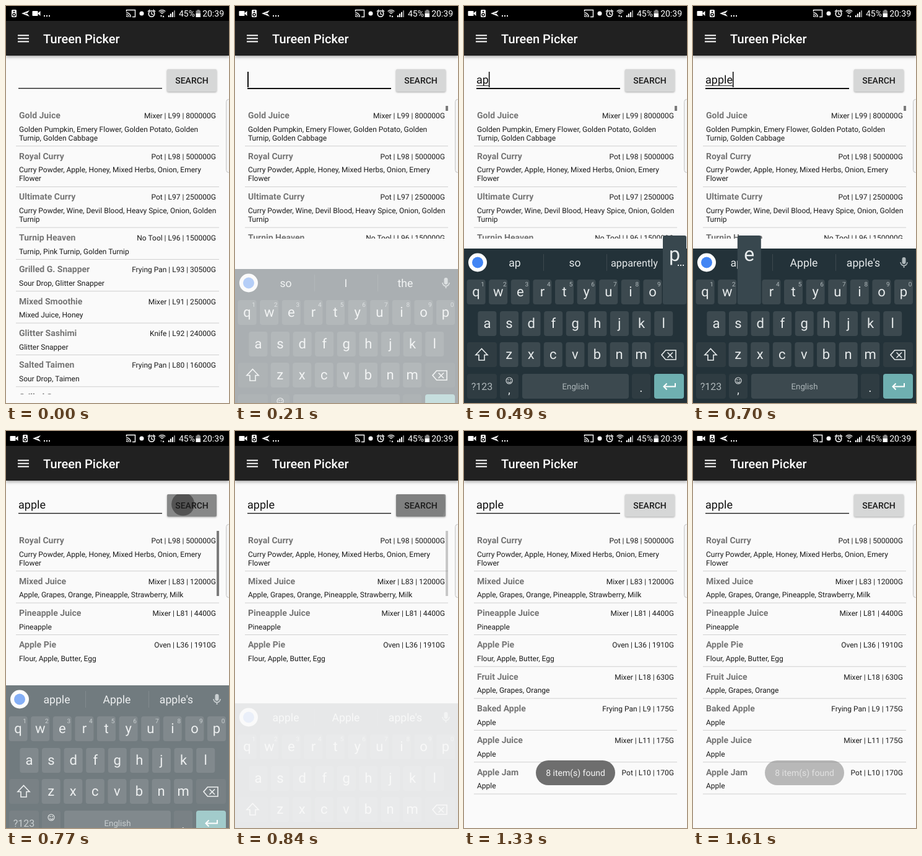
Recreate the animation shown at these times as an HTML page with a canvas. Size 360x640 px, loop 1680 ms.

```html
<!DOCTYPE html>
<html lang="en">
<head>
<meta charset="utf-8">
<title>Tureen Picker</title>
<style>
html, body { margin: 0; width: 100%; height: 100%; overflow: hidden; background: #fafafa; }
canvas { display: block; }
</style>
</head>
<body>
<canvas id="stage" width="360" height="640"></canvas>
<script>
const W = 360, H = 640, LOOP = 1680, STEP = 70;
const screen = document.getElementById('stage').getContext('2d');
const layer = document.createElement('canvas');
layer.width = W;
layer.height = H;
const keys = layer.getContext('2d');
for (const c of [screen, keys]) c.textRendering = 'geometricPrecision';
let g = screen;

const smooth = (t, a, b) => {
  const x = Math.min(1, Math.max(0, (t - a) / (b - a)));
  return x * x * (3 - 2 * x);
};

function rect(x, y, w, h, color) {
  g.fillStyle = color;
  g.fillRect(x, y, w, h);
}
function round(x, y, w, h, r, color) {
  g.beginPath();
  g.roundRect(x, y, w, h, r);
  g.fillStyle = color;
  g.fill();
}
function disc(x, y, r, color) {
  g.beginPath();
  g.arc(x, y, r, 0, 7);
  g.fillStyle = color;
  g.fill();
}
function poly(points, color, stroke) {
  g.beginPath();
  for (let i = 0; i < points.length; i += 2) g.lineTo(points[i], points[i + 1]);
  if (stroke) {
    g.strokeStyle = color;
    g.lineWidth = stroke;
    g.stroke();
  } else {
    g.fillStyle = color;
    g.fill();
  }
}
function arc(x, y, r, a, b, color, width) {
  g.beginPath();
  g.arc(x, y, r, a, b);
  g.strokeStyle = color;
  g.lineWidth = width;
  g.stroke();
}
function text(s, x, y, size, color, weight = 400, align = 'left') {
  g.font = `${weight} ${size}px Roboto, sans-serif`;
  g.textAlign = align;
  g.fillStyle = color;
  g.fillText(s, x, y);
}
function at(x, y, draw) {
  g.save();
  g.translate(x, y);
  draw();
  g.restore();
}

// name, tool and price, ingredient lines
const allItems = [
  ['Gold Juice', 'Mixer | L99 | 800000G', 'Golden Pumpkin, Emery Flower, Golden Potato, Golden', 'Turnip, Golden Cabbage'],
  ['Royal Curry', 'Pot | L98 | 500000G', 'Curry Powder, Apple, Honey, Mixed Herbs, Onion, Emery', 'Flower'],
  ['Ultimate Curry', 'Pot | L97 | 250000G', 'Curry Powder, Wine, Devil Blood, Heavy Spice, Onion, Golden', 'Turnip'],
  ['Turnip Heaven', 'No Tool | L96 | 150000G', 'Turnip, Pink Turnip, Golden Turnip'],
  ['Grilled G. Snapper', 'Frying Pan | L93 | 30500G', 'Sour Drop, Glitter Snapper'],
  ['Mixed Smoothie', 'Mixer | L91 | 25000G', 'Mixed Juice, Honey'],
  ['Glitter Sashimi', 'Knife | L92 | 24000G', 'Glitter Snapper'],
  ['Salted Taimen', 'Frying Pan | L80 | 16000G', 'Sour Drop, Taimen'],
  ['Grilled Snapper', '', 'Snapper']
];
const found = [
  allItems[1],
  ['Mixed Juice', 'Mixer | L83 | 12000G', 'Apple, Grapes, Orange, Pineapple, Strawberry, Milk'],
  ['Pineapple Juice', 'Mixer | L81 | 4400G', 'Pineapple'],
  ['Apple Pie', 'Oven | L36 | 1910G', 'Flour, Apple, Butter, Egg'],
  ['Fruit Juice', 'Mixer | L18 | 630G', 'Apple, Grapes, Orange'],
  ['Baked Apple', 'Frying Pan | L9 | 175G', 'Apple'],
  ['Apple Juice', 'Mixer | L11 | 175G', 'Apple'],
  ['Apple Jam', 'Pot | L10 | 170G', 'Apple']
];

// start time, typed text, pressed key, suggestions
const typing = [
  [0, '', '', ['so', 'I', 'the']],
  [350, 'a', 'a', ['so', 'I', 'the']],
  [420, 'a', '', ['a', 'so', 'and']],
  [490, 'ap', 'p', ['ap', 'so', 'apparently']],
  [560, 'app', 'p', ['app', 'so', 'apps']],
  [630, 'appl', 'l', ['appl', 'apple', 'apply']],
  [700, 'apple', 'e', ['apple', 'Apple', "apple's"]],
  [770, 'apple', '', ['apple', 'Apple', "apple's"]]
];

const statusIcons = {
  speaker() {
    round(-4, -6, 8, 12, 1.5, '#fff');
    disc(0, 2, 2.8, '#000');
    disc(0, 2, 1.3, '#fff');
    disc(0, -3.2, 1.2, '#000');
  },
  arrow() {
    poly([-6, 0, 7, -5, 3, 0, 7, 5], '#fff');
    rect(0, -0.5, 5, 1, '#000');
  },
  video() {
    round(-6.5, -4, 9, 8, 1, '#fff');
    poly([2, 0, 6.5, -4, 6.5, 4], '#fff');
  }
};

function statusBar(t) {
  rect(0, 0, W, 24, '#000');
  const order = t < 70 ? ['speaker', 'arrow', 'video'] : ['video', 'speaker', 'arrow'];
  order.forEach((name, i) => at(13 + i * 18, 12, statusIcons[name]));
  for (let i = 0; i < 3; i++) rect(61 + i * 4, 15, 2, 2, '#fff');

  // cast
  poly([194.5, 9, 194.5, 6.5, 208.5, 6.5, 208.5, 17.5, 204, 17.5], '#fff', 1.4);
  for (const r of [2, 4.7, 7.4]) arc(194, 18, r, -Math.PI / 2, 0, '#fff', 1.3);

  disc(219, 12, 3.5, '#fff');

  // alarm
  disc(235, 12.5, 5.5, '#fff');
  disc(235, 12.5, 3.9, '#000');
  poly([235, 9.5, 235, 13, 238, 14], '#fff', 1.3);
  poly([229, 9, 232.5, 6], '#fff', 1.6);
  poly([241, 9, 237.5, 6], '#fff', 1.6);

  // network
  for (const r of [2.5, 5, 7.5]) arc(252, 14, r, -Math.PI * 0.75, -Math.PI * 0.25, '#ddd', 1.3);
  const busy = t < 770 || t >= 1330;
  poly([249, 15, 252, 15, 250.5, 18], busy ? '#fff' : '#777');
  poly([252.5, 18, 255.5, 18, 254, 15], '#fff');
  for (let i = 0; i < 4; i++) rect(262 + i * 3, 15 - i * 2.6, 2, 3 + i * 2.6, i < 3 ? '#fff' : '#888');

  text('45%', 279, 17, 14, '#fff');
  rect(308.5, 6, 4, 2, '#888');
  rect(306.5, 7.5, 7.5, 5, '#888');
  rect(306.5, 12, 7.5, 6, '#fff');
  text('20:39', 352, 17, 14, '#fff', 400, 'right');
}

function appBar() {
  g.save();
  g.shadowColor = 'rgba(0,0,0,.35)';
  g.shadowBlur = 5;
  g.shadowOffsetY = 2;
  rect(0, 24, W, 56, '#212121');
  g.restore();
  for (const y of [46.4, 51.4, 56.4]) rect(19, y, 18, 2, '#fff');
  text('Tureen Picker', 60, 60, 20, '#fff', 500);
}

function searchField(t, typed) {
  const focus = t >= 70 && t < 770;
  if (focus) rect(20, 132, 232, 2, '#111');
  else rect(20, 132, 232, 1.4, '#222');
  text(typed, 20, 125, 18, '#111');
  if (!focus) return;
  const end = 20 + g.measureText(typed).width;
  if (typed) rect(20, 128, end - 20, 1, '#333');
  rect(typed ? end : 20, 106, typed ? 1.6 : 2, 25, '#111');
}

function searchButton(t) {
  g.save();
  g.shadowColor = 'rgba(0,0,0,.35)';
  g.shadowBlur = 3;
  g.shadowOffsetY = 1;
  round(260, 102, 80, 36, 2, '#d6d7d7');
  g.restore();
  if (t >= 770 && t < 1120) {
    const x = (t - 770) / 350;
    g.save();
    g.beginPath();
    g.roundRect(260, 102, 80, 36, 2);
    g.clip();
    rect(260, 102, 80, 36, `rgba(0,0,0,${0.37 * (1 - x * x)})`);
    disc(285.7, 118, 18.6 + (t - 770) / 2, `rgba(40,40,40,${Math.max(0, 0.55 - x * 2.2)})`);
    g.restore();
  }
  text('SEARCH', 300, 125.4, 14, '#1a1a1a', 500, 'center');
}

function list(items, bottom) {
  g.save();
  g.beginPath();
  g.rect(0, 160, W, bottom - 160);
  g.clip();
  let top = 160;
  for (const [name, info, ...lines] of items) {
    const base = top + 21;
    text(name, 21, base, 14, '#757575', 700);
    text(info, 339, base, 12, '#1a1a1a', 400, 'right');
    lines.forEach((s, i) => text(s, 21, top + 42.6 + i * 14.2, 12, '#1a1a1a'));
    top += lines.length > 1 ? 65.67 : 51.33;
    rect(16, top - 0.4, 328, 1, '#d0d0d0');
  }
  g.restore();
}

function scrollbar(t) {
  if (t < 210 || t >= 910) return;
  const short = t < 770;
  g.globalAlpha = t < 840 ? 1 : 0.4;
  rect(340, 161, 4, short ? 8 : 105, '#7b7b7b');
  g.globalAlpha = 1;
}

function edgeHandle() {
  round(355.5, 150.5, 12, 118, 4, '#f5f5f5');
  g.strokeStyle = '#c4c4c4';
  g.lineWidth = 1;
  g.stroke();
}

const KEY = '#3c494f', SIDE_KEY = '#2f3c42', INK = '#e6eaeb', DIM = '#aeb7ba', PITCH = 35.6;
const rows = [['qwertyuiop', 19.6, 461], ['asdfghjkl', 37.4, 512], ['zxcvbnm', 72.6, 562]];

const cap = (x, y, w, color = KEY) => round(x - w / 2, y - 20, w, 40, 4, color);

function popup(letter) {
  const [row, x0, y] = rows.find(r => r[0].includes(letter));
  const x = Math.min(340, x0 + row.indexOf(letter) * PITCH);
  round(x - 19, y - 91, 38, 111, 3, '#38474e');
  text(letter, x, y - 50, 32, INK, 400, 'center');
  if (letter === 'p') for (let i = 0; i < 3; i++) rect(345 + i * 4, 417, 2, 2, INK);
}

function keyboard(pressed, words) {
  keys.clearRect(0, 0, W, H);
  g = keys;
  rect(0, 391, W, 249, '#233239');

  disc(22, 413.5, 15, '#fff');
  disc(22, 413.5, 9, '#4285f4');
  words.forEach((s, i) => {
    text(s, [82, 179, 275][i], 419.5, s.length > 8 ? 16.3 : 17.6, INK, 400, 'center');
  });
  for (const x of [128, 230]) rect(x, 400, 1, 27, '#3d494f');
  round(337.5, 405, 6, 11, 3, DIM);
  arc(340.5, 413, 5.5, 0, Math.PI, DIM, 1.6);
  rect(339.6, 418, 1.8, 4, DIM);

  rows.forEach(([row, x0, y], r) => [...row].forEach((c, i) => {
    const x = x0 + i * PITCH;
    cap(x, y, 30);
    text(c, x, y + 7, 22, INK, 400, 'center');
    if (r === 0) text((i + 1) % 10, x + 10.5, y - 9, 10, DIM, 400, 'center');
  }));

  cap(29, 562, 48, SIDE_KEY);
  poly([28.5, 552.5, 38, 562.5, 33, 562.5, 33, 571, 24, 571, 24, 562.5, 19, 562.5, 28.5, 552.5, 31, 555], INK, 1.6);
  cap(331, 562, 48, SIDE_KEY);
  poly([319, 562.5, 325.5, 555, 342, 555, 342, 570, 325.5, 570, 319, 562.5, 320, 561], INK, 1.6);
  poly([328.5, 558.5, 337, 567], INK, 1.6);
  poly([337, 558.5, 328.5, 567], INK, 1.6);

  cap(29, 613, 48, SIDE_KEY);
  text('?123', 29, 619, 16, DIM, 400, 'center');
  cap(73, 613, 30, SIDE_KEY);
  arc(73, 604, 5, 0, 7, INK, 1.1);
  arc(73, 604.5, 2.6, 0.2, 2.9, INK, 1.1);
  disc(71.3, 602.5, 0.9, INK);
  disc(74.7, 602.5, 0.9, INK);
  text(',', 73, 625, 18, INK, 400, 'center');
  cap(180, 613, 172);
  text('English', 180, 618, 13.3, DIM, 400, 'center');
  cap(286, 613, 30, SIDE_KEY);
  text('.', 286, 621.5, 20, INK, 400, 'center');
  cap(331, 613, 48, '#6fb0b1');
  poly([341, 608, 341, 613.5, 323, 613.5], '#fff', 2);
  poly([327.5, 608.5, 322.5, 613.5, 327.5, 618.5], '#fff', 2);

  if (pressed) popup(pressed);
  g = screen;
}

function toast(t) {
  const alpha = smooth(t, 870, 1080) - smooth(t, 1470, 1740);
  if (alpha <= 0) return;
  g.globalAlpha = alpha;
  round(116, 531, 128, 40, 20, '#6e6e6e');
  g.globalAlpha = Math.min(1, alpha * 1.4);
  text('8 item(s) found', 180, 556, 14, '#f6f6f6', 400, 'center');
  g.globalAlpha = 1;
}

function draw(t) {
  const [, typed, pressed, words] = typing.findLast(s => t >= s[0]);
  rect(0, 0, W, H, '#fafafa');
  appBar();
  statusBar(t);
  searchField(t, typed);
  searchButton(t);
  list(t < 770 ? allItems : found, t >= 210 && t < 910 ? 375 : 626);
  scrollbar(t);
  edgeHandle();

  const shown = smooth(t, 140, 310) - smooth(t, 700, 870);
  if (shown > 0) {
    keyboard(pressed, words);
    g.globalAlpha = shown;
    g.drawImage(layer, 0, Math.round((1 - shown) * 52));
    g.globalAlpha = 1;
  }
  toast(t);
}

const start = performance.now();
function tick() {
  const t = (performance.now() - start) % LOOP;
  draw(Math.floor(t / STEP) * STEP);
  requestAnimationFrame(tick);
}
tick();
</script>
</body>
</html>
```
